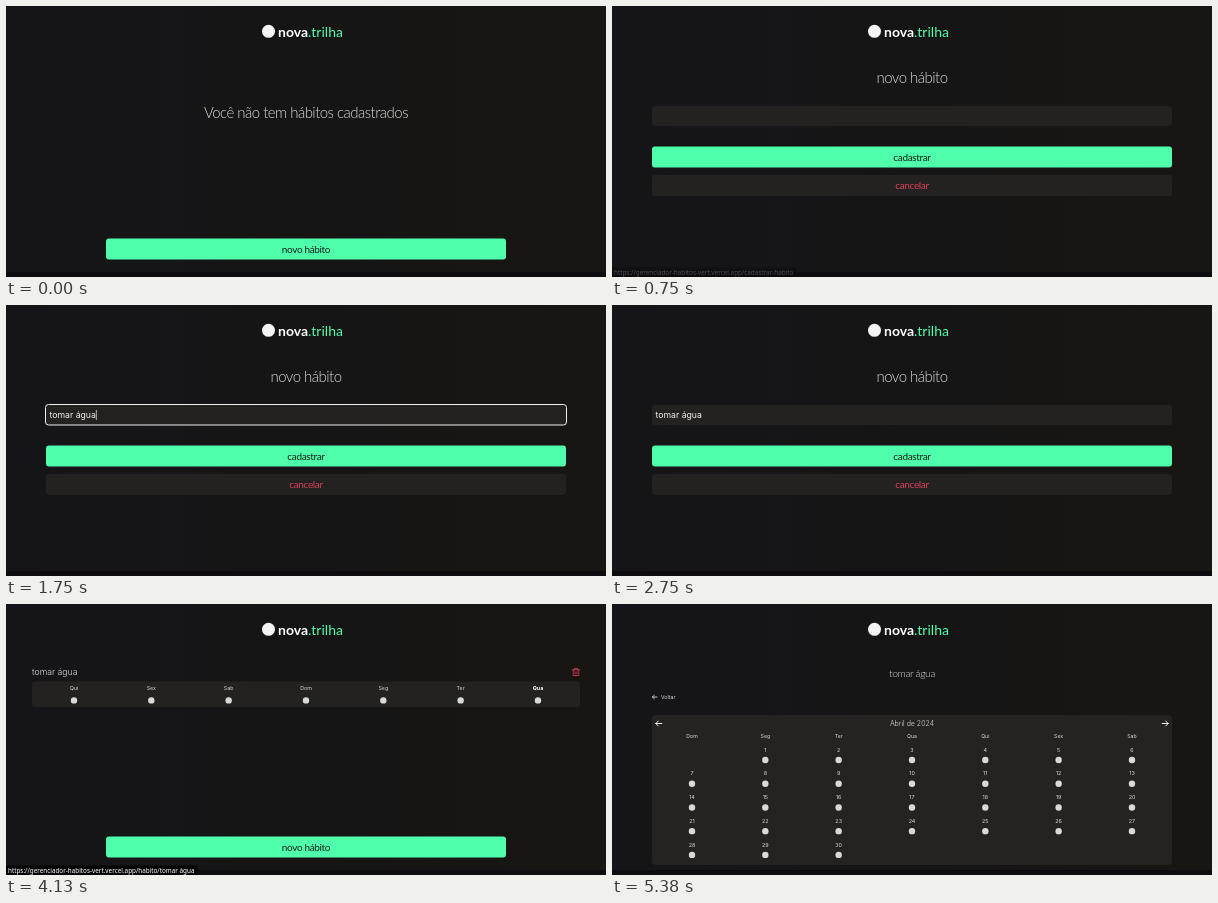
Recreate the animation shown at these times as an HTML page. Size 600 px wide and 271 px high, loop 8 s.

```html
<!DOCTYPE html>
<html lang="pt-BR">
<head>
<meta charset="utf-8">
<title>nova.trilha</title>
<style>
  html, body { margin: 0; width: 100%; height: 100%; overflow: hidden; background: #161416; }
  svg { display: block; width: 100%; height: 100%; }
  text { font-family: Inter, sans-serif; fill: #dcdcda; white-space: pre; }
  .round { font-family: Lato, sans-serif; letter-spacing: -.035em; }
  .mid { text-anchor: middle; }
  .line { fill: none; stroke: #f0f0ee; stroke-linecap: round; stroke-linejoin: round; }
  .url { font-family: "Noto Sans", sans-serif; fill: #fff; }
</style>
</head>
<body>
<svg id="stage" viewBox="0 0 600 271"></svg>
<script>
const LOOP = 8000;
const PANEL = '#232221', GREEN = '#50ffab', RED = '#d8405a', DOT = '#d9d9d6';
const SITE = 'https://gerenciador-habitos-vert.vercel.app';
const HABIT = 'tomar água';

const text = (x, y, size, str, attrs = '') =>
  `<text x="${x}" y="${y}" font-size="${size}" ${attrs}>${str}</text>`;
const centered = (x, y, size, str, attrs = '') => text(x, y, size, str, `class="mid" ${attrs}`);
const rounded = (x, y, size, str, attrs = '') => text(x, y, size, str, `class="mid round" ${attrs}`);
const box = (x, y, w, h, fill, r = 3) =>
  `<rect x="${x}" y="${y}" width="${w}" height="${h}" rx="${r}" fill="${fill}"/>`;
const dot = (x, y, r = 3.2) => `<circle cx="${x}" cy="${y}" r="${r}" fill="${DOT}"/>`;
const line = (d, width = 1, color = '#f0f0ee') =>
  `<path class="line" d="${d}" stroke-width="${width}" style="stroke:${color}"/>`;
const group = (id, content) => `<g id="${id}">${content}</g>`;

const newHabitButton = box(100, 232.5, 400, 21, GREEN)
  + rounded(300, 246.5, 10, 'novo hábito', 'style="fill:#16201b"');

function header() {
  return '<circle cx="262.5" cy="25.3" r="6.5" fill="#f4f4f2"/>'
    + text(272, 31, 14, `<tspan font-weight="700" fill="#fff">nova</tspan><tspan fill="${GREEN}">.trilha</tspan>`,
      'class="round" style="letter-spacing:0"');
}

function emptyPage() {
  return rounded(300, 111.5, 15, 'Você não tem hábitos cadastrados', 'font-weight="300"') + newHabitButton;
}

function formPage() {
  return rounded(300, 76.5, 15, 'novo hábito', 'font-weight="300"')
    + box(40, 100, 520, 20, PANEL)
    + '<rect id="ring" x="39.5" y="99.5" width="521" height="20.5" rx="3" fill="none" stroke="#f0f0ee"/>'
    + text(43.5, 113, 8.7, '', 'id="typed" style="fill:#f0f0ee"')
    + '<rect id="caret" y="105" width=".7" height="10" fill="#eee"/>'
    + box(40, 140.5, 520, 21, GREEN)
    + rounded(300, 154.7, 10, 'cadastrar', 'style="fill:#16201b"')
    + box(40, 169, 520, 21, PANEL)
    + rounded(300, 183, 10, 'cancelar', `style="fill:${RED}"`);
}

function listPage() {
  const days = ['Qui', 'Sex', 'Sab', 'Dom', 'Seg', 'Ter', 'Qua'].map((day, i) => {
    const x = 68 + i * 77.33;
    const look = i === 6 ? 'font-weight="700" style="fill:#fff"' : '';
    return centered(x, 86.2, 5.3, day, look) + dot(x, 96.4);
  }).join('');
  const trash = 'M566.3 65.8H573.7M568.4 65.6V64.4H571.6V65.6M567.2 66V71.6H572.8V66M569.1 67.7V70M570.9 67.7V70';
  return text(26, 71, 8.7, HABIT, 'font-weight="300"') + line(trash, .8, RED)
    + box(26, 77.5, 548, 25.5, PANEL) + days + newHabitButton;
}

function calendarPage() {
  const column = i => 80 + i * 73.33;
  let out = rounded(300, 72.7, 10.3, HABIT, 'font-weight="300"')
    + line('M45 93H40.4M42.3 91.2L40.4 93L42.3 94.8', .8)
    + text(49, 95, 5.2, 'Voltar')
    + box(40, 111, 520, 150, '#242321', 4)
    + line('M49.8 119.5H43.8M46.3 117L43.8 119.5L46.3 122M550.2 119.5H556.2M553.7 117L556.2 119.5L553.7 122')
    + centered(300, 122, 7, 'Abril de 2024', 'font-weight="300"');
  ['Dom', 'Seg', 'Ter', 'Qua', 'Qui', 'Sex', 'Sab'].forEach((day, i) => {
    out += centered(column(i), 133.6, 5.2, day);
  });
  for (let day = 1; day <= 30; day++) {
    const x = column(day % 7), y = 156 + Math.floor(day / 7) * 23.72;
    out += centered(x, y - 8.3, 5.4, day) + dot(x, y);
  }
  return out;
}

const stage = document.getElementById('stage');
stage.innerHTML = `<defs><linearGradient id="tone">
    <stop stop-color="#151418"/><stop offset="1" stop-color="#171613"/></linearGradient></defs>`
  + box(0, 0, 600, 271, 'url(#tone)', 0) + box(0, 266, 600, 5, '#0f0c0f', 0) + header()
  + group('empty', emptyPage()) + group('form', formPage())
  + group('list', listPage()) + group('calendar', calendarPage())
  + group('status', '<rect id="statusBox" y="261.5" height="9.5" fill="#050505"/>'
    + text(2, 268.6, 6.34, '', 'class="url" id="statusText"'));

const $ = id => document.getElementById(id);
const pages = [[0, 'empty'], [750, 'form'], [3130, 'list'], [4380, 'calendar']];
const typing = [[0, ''], [1500, 'tomar '], [1750, HABIT]];
const links = [
  [0, '', 0],
  [630, '/cadastrar-habito', .25], [880, '', 0],
  [4000, '/habito/' + HABIT, .5], [4130, '/habito/' + HABIT, 1], [4500, '', 0],
  [5250, '', .5], [5380, '', 0]
];
const at = (steps, t) => steps.filter(step => step[0] <= t).pop();
const show = (id, on) => $(id).setAttribute('visibility', on ? 'inherit' : 'hidden');

function render(t) {
  const page = at(pages, t)[1];
  for (const [, id] of pages) $(id).setAttribute('display', id === page ? 'inline' : 'none');

  const focused = t >= 1380 && t < 2130;
  show('ring', focused);
  show('caret', focused);
  $('typed').textContent = at(typing, t)[1];
  if (focused) $('caret').setAttribute('x', 43.5 + $('typed').getComputedTextLength());

  const [, path, opacity] = at(links, t);
  $('status').setAttribute('opacity', opacity);
  $('statusText').textContent = SITE + path;
  $('statusBox').setAttribute('width', $('statusText').getComputedTextLength() + 5);
}

const start = performance.now();
function tick() {
  render((performance.now() - start) % LOOP);
  requestAnimationFrame(tick);
}
tick();
</script>
</body>
</html>
```
